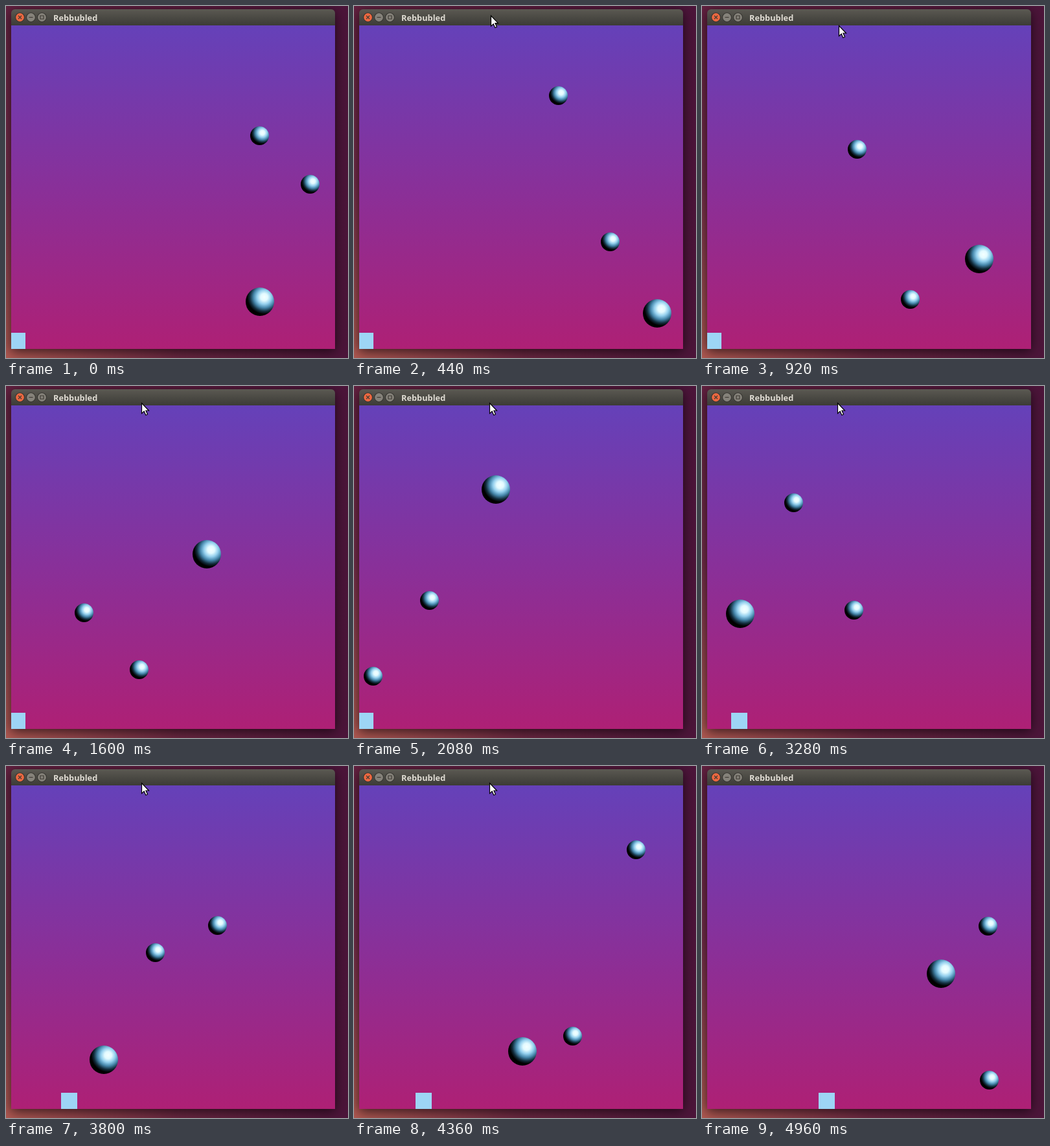
These frames come from a looping animation (528x544 px, 5000 ms). An HTML page with a canvas:

```html
<!DOCTYPE html>
<html lang="en">
<head>
<meta charset="utf-8">
<title>Rebbubled</title>
<style>
html, body { margin: 0; height: 100%; overflow: hidden; background: #4a1538; }
canvas { display: block; }
</style>
</head>
<body>
<canvas id="stage" width="528" height="544"></canvas>
<script>
const ctx = document.getElementById('stage').getContext('2d');
const LOOP = 5000, TICK = 40;
const WIN = { x: 8, y: 30, size: 500 };

// Knots as [key, value] pairs, joined by straight lines.
const TRAVEL = [[0, 0], [22, 151.7], [38, 270.4], [62, 452.3], [79, 578.7], [91, 670.6], [119, 889]];
const PLAYER = [[2480, 5], [2520, 10], [2600, 10], [3280, 45], [3360, 45], [3800, 85],
  [3920, 85], [4440, 100], [4960, 180]];
const MOUSE_X = [[920, 211], [1080, 209]];
const MOUSE_Y = [[240, -24], [520, 30], [920, 30], [1080, 26], [4680, 26], [4880, -24]];

const BALLS = [
  { r: 22, x: 392, y: 457, vx: 1, vy: 1.105, left: 30 },
  { r: 14.5, x: 391.5, y: 200.5, vx: -1.002, vy: -1.086, left: 23 },
  { r: 14.5, x: 469, y: 275, vx: -0.975, vy: 1.175, left: 23 }
];
const CEILING = 114, FLOOR = 530, RIGHT = 508;

function lerpKnots(knots, key) {
  if (key <= knots[0][0]) return knots[0][1];
  for (let i = 1; i < knots.length; i++) {
    const [k0, v0] = knots[i - 1], [k1, v1] = knots[i];
    if (key <= k1) return v0 + (v1 - v0) * (key - k0) / (k1 - k0);
  }
  return knots[knots.length - 1][1];
}

function bounce(p, lo, hi) {
  const span = hi - lo, period = 2 * span;
  const m = (((p - lo) % period) + period) % period;
  return lo + (m > span ? period - m : m);
}

function linear(x0, y0, x1, y1, ...colors) {
  const g = ctx.createLinearGradient(x0, y0, x1, y1);
  colors.forEach((c, i) => g.addColorStop(i / (colors.length - 1), c));
  return g;
}

function circle(x, y, r, fill) {
  ctx.beginPath();
  ctx.arc(x, y, r, 0, 7);
  ctx.fillStyle = fill;
  ctx.fill();
}

function drawDesktop() {
  ctx.fillStyle = linear(0, 0, 0, 544, '#62203f', '#732c49', '#ad5850');
  ctx.fillRect(0, 0, 528, 544);
  ctx.fillStyle = linear(0, 0, 528, 0, '#5a193c00', '#58193ccc', '#4b1439');
  ctx.fillRect(0, 0, 528, 544);
}

function drawButton(x, fill, glyph) {
  circle(x, 17.5, 7.3, '#33322e');
  circle(x, 17.5, 6.4, fill);
  ctx.strokeStyle = '#3f3b35';
  ctx.lineWidth = 1.2;
  ctx.stroke(new Path2D(`M${x} 17.5${glyph}`));
}

function drawWindow() {
  ctx.save();
  ctx.shadowColor = 'rgba(0,0,0,.65)';
  ctx.shadowBlur = 18;
  ctx.shadowOffsetY = 4;
  ctx.fillStyle = linear(0, 5, 0, 30, '#5b5952', '#4b4a44', '#3c3b37');
  ctx.beginPath();
  ctx.roundRect(8, 5, 500, 525, [6, 6, 0, 0]);
  ctx.fill();
  ctx.restore();

  ctx.fillStyle = linear(0, 30, 0, 530, '#6541b9', '#893099', '#ae2075');
  ctx.fillRect(WIN.x, WIN.y, WIN.size, WIN.size);

  drawButton(21.5, '#ec6840', 'm-2.5-2.5l5 5m0-5l-5 5');
  drawButton(38.5, '#85827a', 'm-3 0h6');
  drawButton(55.5, '#85827a', 'm-2.5-2.5h5v5h-5z');

  ctx.font = 'bold 12.8px "Open Sans", sans-serif';
  ctx.fillStyle = '#dfdbd2';
  ctx.fillText('Rebbubled', 73, 23);
}

function drawBall({ r, x, y, vx, vy, left }, travel) {
  const px = Math.round(bounce(x + vx * travel, left, RIGHT - r) - r) + r;
  const py = Math.round(bounce(y + vy * travel, CEILING + r, FLOOR - r) - r) + r;
  const hx = px + 0.3 * r, hy = py - 0.32 * r;
  const shade = ctx.createRadialGradient(hx, hy, 0, hx, hy, 1.25 * r);
  [[0, '#f4ffff'], [0.2, '#e2faff'], [0.4, '#93cfed'], [0.6, '#4687ab'], [0.8, '#122c3b'], [0.95, '#000']]
    .forEach(([at, color]) => shade.addColorStop(at, color));
  circle(px, py, r, shade);
}

function drawPlayer(t) {
  const x = Math.floor(lerpKnots(PLAYER, t) / 5 + 1e-6) * 5;
  const left = Math.max(x, WIN.x);
  ctx.fillStyle = '#9dd5f5';
  ctx.fillRect(left, 505, x + 25 - left, 25);
}

function drawMouse(t) {
  ctx.save();
  ctx.translate(lerpKnots(MOUSE_X, t) + 0.5, lerpKnots(MOUSE_Y, t) + 0.5);
  const arrow = new Path2D('M0 0V16L3.7 12.6L6.3 18.5L9 17.3L6.4 11.5H11Z');
  ctx.fillStyle = '#fff';
  ctx.strokeStyle = '#000';
  ctx.lineWidth = 1.2;
  ctx.fill(arrow);
  ctx.stroke(arrow);
  ctx.restore();
}

function draw(now) {
  const frame = Math.floor((now % LOOP) / TICK);
  const t = frame * TICK;
  // The picture holds still for one tick each second.
  const steps = frame - Math.floor((frame + 13) / 25);
  const travel = lerpKnots(TRAVEL, steps);
  drawDesktop();
  drawWindow();
  drawPlayer(t);
  BALLS.forEach(ball => drawBall(ball, travel));
  drawMouse(t);
}

let start;
function loop(now) {
  start ??= now;
  draw(Math.max(0, now - start));
  requestAnimationFrame(loop);
}
requestAnimationFrame(loop);
</script>
</body>
</html>
```
